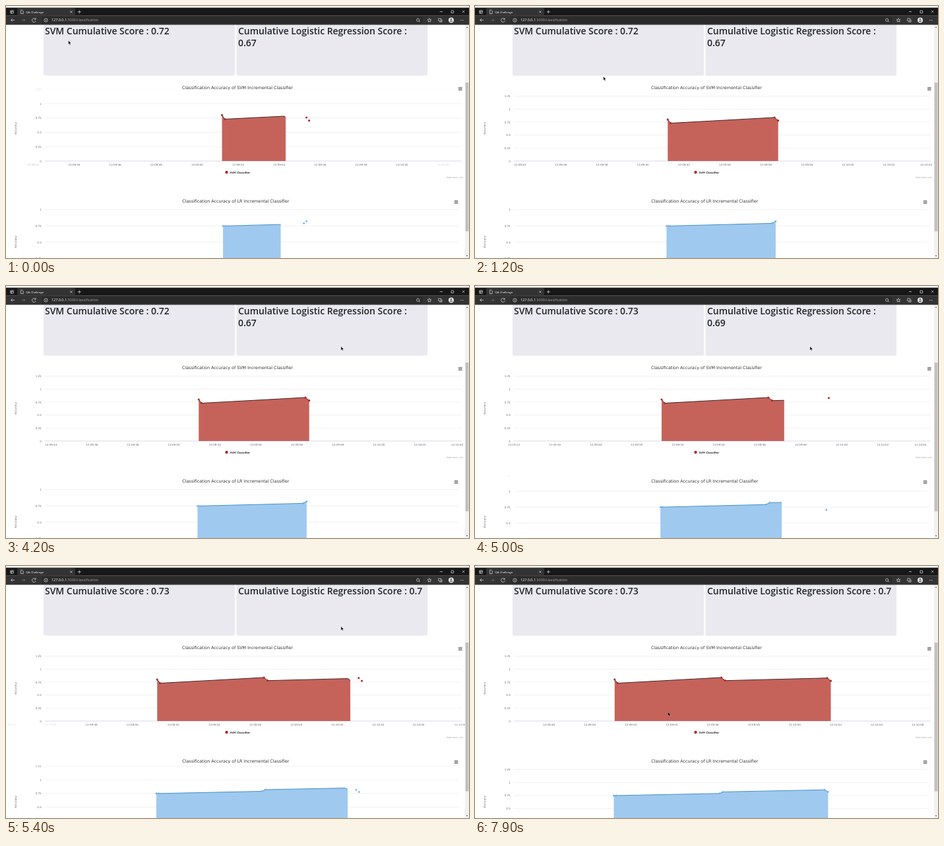
An HTML page that plays this animation: 702x382 px, repeating every 8000 ms.

```html
<!DOCTYPE html>
<html lang="en">
<head>
<meta charset="utf-8">
<title>Classification dashboard</title>
<style>
  html, body { margin: 0; width: 100%; height: 100%; overflow: hidden; background: #fff; }
  svg { display: block; width: 702px; height: 382px; }
  text { font-family: "DejaVu Sans", "Open Sans", sans-serif; }
  .ui { font-family: "Open Sans", "Noto Sans", sans-serif; fill: #fff; }
  .score { font: 600 13.95px "Open Sans", "Noto Sans", sans-serif; fill: #212529; }
  .title { font-size: 6.35px; fill: #333; text-anchor: middle; }
  .label { font-size: 4.02px; fill: #666; }
  .mid { text-anchor: middle; }
  .end { text-anchor: end; }
  .axis { font-size: 4.2px; fill: #666; text-anchor: middle; }
  .grid { stroke: #e6e6e6; stroke-width: .6; }
  .icon { fill: none; stroke: #e4e4e4; stroke-width: .7; }
  .menu { fill: none; stroke: #555; stroke-width: 1; }
</style>
</head>
<body>
<svg viewBox="0 0 702 382">
  <rect width="702" height="382" fill="#fff"/>

  <g fill="#e9e9ef">
    <rect x="57" y="20" width="290" height="85.5" rx="1.5"/>
    <rect x="349.5" y="20" width="289.5" height="85.5" rx="1.5"/>
  </g>
  <text class="score" id="svmScore" x="59" y="43"></text>
  <text class="score" id="lrScore" x="352" y="43"></text>
  <text class="score" id="lrWrap" x="352" y="60.5"></text>

  <g id="svm"></g>
  <text class="title" x="351" y="126">Classification Accuracy of SVM Incremental Classifier</text>
  <text class="axis" transform="translate(15.5 185.5) rotate(-90)">Accuracy</text>
  <path class="menu" d="M686 123.6h5.6m-5.6 1.9h5.6m-5.6 1.9h5.6"/>
  <circle cx="334.5" cy="252" r="2.2" fill="#b22a26"/>
  <text x="339.3" y="253.5" font-size="3.85" font-weight="bold" fill="#333">SVM Classifier</text>
  <text class="end" x="693" y="261.2" font-size="3.2" fill="#999">Highcharts.com</text>

  <g id="lr"></g>
  <text class="title" x="348.3" y="298">Classification Accuracy of LR Incremental Classifier</text>
  <text class="axis" transform="translate(15.5 357.5) rotate(-90)">Accuracy</text>
  <path class="menu" d="M679.8 295.4h5.6m-5.6 1.9h5.6m-5.6 1.9h5.6"/>

  <!-- scrollbar -->
  <rect x="696" y="28" width="6" height="354" fill="#f1f1f1"/>
  <rect x="696.6" y="116" width="4.8" height="225.5" fill="#c1c1c1"/>
  <path d="M697.6 33l1.4-1.6 1.4 1.6zM697.6 378l1.4 1.6 1.4-1.6z" fill="#505050"/>

  <!-- browser frame -->
  <rect width="702" height="3" fill="#fff"/>
  <rect y="2.5" width="702" height="12" fill="#171717"/>
  <rect y="14.3" width="702" height="14.2" fill="#333"/>
  <path d="M17 14.5V5q0-2 2-2h84q2 0 2 2v9.5z" fill="#333"/>
  <rect x="54" y="16.3" width="578" height="10.4" rx="1.5" fill="#2b2b2b"/>
  <text class="ui" x="30.3" y="10.5" font-size="4.3">QA Challenge</text>
  <text class="ui" x="69" y="23.4" font-size="5.45">127.0.0.1<tspan fill="#a6a6a6">:5000/classification</tspan></text>
  <g class="icon">
    <path d="M6.8 6.8h4.4v4.4h-4.4zM6.8 8.4h4.4M8.4 8.4v2.8"/>
    <path d="M22.4 6.2h2.4l1.4 1.4v4h-3.8z"/>
    <path d="M97.3 7.4l3 3m0-3l-3 3M108.8 8.9h5m-2.5-2.5v5"/>
    <path d="M13 21.4H7.6m2.4-2.4l-2.4 2.4 2.4 2.4"/>
    <path d="M23.5 21.4h5.4m-2.4-2.4l2.4 2.4-2.4 2.4" stroke="#777"/>
    <path d="M44.8 20a2.9 2.9 0 1 0 .4 2.3M45.1 18.4v1.9h-1.9"/>
    <circle cx="60.5" cy="21.5" r="2.7"/><path d="M60.5 21v2m0-3.2v.6"/>
    <circle cx="624.6" cy="21.2" r="2.1"/><path d="M626 22.8l1.8 1.4"/>
    <path d="M642 18.6l.9 1.9 2 .2-1.5 1.4.4 2-1.8-1-1.8 1 .4-2-1.5-1.4 2-.2z"/>
    <path d="M655.8 19h3.8v3.8h-3.8zM657.2 24.2h3.8v-3.8"/>
    <path d="M657.8 8.6h4.2M675 7h3.6v3.6H675zM691.9 6.8l3.4 3.4m0-3.4l-3.4 3.4"/>
  </g>
  <circle cx="675" cy="21.4" r="4" fill="#e6e6e6"/>
  <circle cx="675" cy="20.3" r="1.4" fill="#777"/>
  <path d="M672.6 24a2.4 2 0 0 1 4.8 0z" fill="#777"/>
  <g fill="#e4e4e4"><circle cx="689.4" cy="21.5" r=".5"/><circle cx="691.3" cy="21.5" r=".5"/><circle cx="693.2" cy="21.5" r=".5"/></g>

  <path id="cursor" d="M0 0v5.6l1.3-1.2.9 2 .9-.4-.9-1.9h1.7z" fill="#000" stroke="#fff" stroke-width=".25"/>
</svg>

<script>
const LOOP = 8000, STEP = 100, MOVE = 500;
const FIRST = 4888, SECOND = 5100;   // times at which new samples arrive
const LEFT = 59, SEC = 31.07;
const $ = id => document.getElementById(id);

const ease = x => (1 - Math.cos(Math.PI * Math.min(1, Math.max(0, x)))) / 2;
const lerp = (a, b, p) => a + (b - a) * p;
const mix = (a, b, p) => Array.isArray(b) ? b.map((v, i) => mix(a[i], v, p)) : lerp(a, b, p);

function add(parent, tag, attrs, text) {
  const el = document.createElementNS("http://www.w3.org/2000/svg", tag);
  set(el, attrs);
  if (text) el.textContent = text;
  return parent.appendChild(el);
}
function set(el, attrs) {
  for (const k in attrs) el.setAttribute(k, attrs[k]);
}

// Ticks run every two seconds from 12:09:40; x0 is the place of 12:09:44.
const TICKS = Array.from({ length: 14 }, (_, k) => k);
const clock = k => {
  const s = 40 + 2 * k;
  return `12:${s < 60 ? "09" : "10"}:${String(s % 60).padStart(2, "0")}`;
};

const charts = [
  {
    id: "svm", base: 235, right: 691, scale: 1, hasTime: true,
    area: "#c5635a", line: "#43282d", mark: "#b22a26", size: 1.6,
    samples: [[7.21, .8], [7.35, .73], [12.42, .84], [12.6, .78], [17.58, .83], [17.76, .775]],
    x0: [103.5, 68.2, -9.8, -12.3], unit: [87, 78.6, 78.6, 78.6], top: [.25, 1, 1, 1],
    tail: [[422, 167], [424, 168.7]], fresh: [[455.5, 169], [459.6, 173.7]]
  },
  {
    id: "lr", base: 407.2, right: 686.5, scale: .992, hasTime: false,
    area: "#9fc9ee", line: "#4590c6", mark: "#6db1e6", size: 1.5, diamond: true,
    samples: [[7.21, .75], [7.33, .75], [12.4, .79], [12.58, .82], [17.58, .86], [17.75, .82]],
    x0: [107.2, 68.2, -9.8, -12.3], unit: [98.4, 98.4, 79, 79], top: [0, 0, 1, 1],
    tail: [[413.5, 331.2], [416.5, 331]], fresh: [[451.7, 329.4], [455.7, 326.3]]
  }
];

function makeState(c, i) {
  const px = s => LEFT + (c.x0[i] + s * SEC - LEFT) * c.scale;
  const points = c.samples.slice(0, [2, 4, 5, 6][i]).map(([s, v]) => [px(s), c.base - v * c.unit[i]]);
  const ticks = TICKS.map(k => {
    const x = px(2 * k - 4), seen = x > LEFT - 1 && x < c.right + 1;
    return [seen ? Math.min(x, 684) : x, +seen];
  });
  const state = { unit: c.unit[i], top: c.top[i], ticks, path: points, marks: points };
  if (i === 0) {
    state.path = points.concat(c.tail);
    state.marks = points.concat(c.fresh);
    ticks[1][1] = .4;
    ticks[11][1] = .3;
  }
  return state;
}

// Lines grow out of their last point; new markers appear in their final place.
function blend(a, b, p) {
  const end = a.path[a.path.length - 1];
  return {
    unit: lerp(a.unit, b.unit, p),
    top: lerp(a.top, b.top, p),
    ticks: mix(a.ticks, b.ticks, p),
    path: mix(b.path.map((_, i) => a.path[i] || end), b.path, p),
    marks: mix(b.marks.map((v, i) => a.marks[i] || v), b.marks, p)
  };
}

function build(c) {
  const g = $(c.id);
  c.states = [0, 1, 2, 3].map(i => makeState(c, i));
  c.rows = [0, .25, .5, .75, 1, 1.25].map(v => ({
    v,
    line: add(g, "line", { class: "grid", x1: LEFT, x2: c.right }),
    text: add(g, "text", { class: "label end", x: 53.7 }, String(v))
  }));
  if (c.hasTime) {
    add(g, "line", { x1: LEFT, x2: c.right, y1: c.base, y2: c.base, stroke: "#ccd6eb", "stroke-width": .6 });
    c.times = TICKS.map(k => add(g, "text", { class: "label mid", y: 241.7 }, clock(k)));
  }
  c.fill = add(g, "path", { fill: c.area });
  c.stroke = add(g, "path", { fill: "none", stroke: c.line, "stroke-width": 1, "stroke-linejoin": "round" });
  const r = c.size, d = r * 1.15;
  c.dots = c.samples.map(() => c.diamond
    ? add(g, "path", { d: `M0 ${-d}L${d} 0L0 ${d}L${-d} 0z`, fill: c.mark })
    : add(g, "circle", { r, fill: c.mark }));
}

function stateAt(c, t) {
  const [s0, s1, s2, s3] = c.states;
  if (t < FIRST) {
    const done = ease(.41);   // the loop opens inside a move
    return blend(s0, s1, (ease(.41 + t / MOVE) - done) / (1 - done));
  }
  const p = ease((Math.min(t, SECOND) - FIRST) / MOVE);
  const s = blend(s1, s2, p);
  return t < SECOND ? s : blend(s, s3, ease((t - SECOND) / MOVE));
}

function draw(c, t) {
  const s = stateAt(c, t);
  for (const { v, line, text } of c.rows) {
    const y = c.base - v * s.unit, opacity = v > 1 ? s.top : 1;
    set(line, { y1: y, y2: y, opacity });
    set(text, { y: y + 1.5, opacity });
  }
  if (c.times) c.times.forEach((el, k) => set(el, { x: s.ticks[k][0], opacity: s.ticks[k][1] }));
  const d = "M" + s.path.map(p => p.join(" ")).join("L");
  const last = s.path[s.path.length - 1];
  set(c.stroke, { d });
  set(c.fill, { d: `${d}L${last[0]} ${c.base}L${s.path[0][0]} ${c.base}z` });
  c.dots.forEach((el, i) => {
    const m = s.marks[i];
    set(el, m ? { transform: `translate(${m[0]} ${m[1]})`, opacity: 1 } : { opacity: 0 });
  });
}

// time, x, y
const trail = [
  [0, 94.7, 52.5], [1000, 190, 104], [1200, 194.7, 107], [1500, 225, 107], [2600, 509, 90.5],
  [3000, 509, 90.5], [3800, 508, 91.7], [5500, 508, 91.7], [6200, 334.7, 193.8],
  [6400, 334.7, 193.8], [7200, 297, 217], [7700, 292.7, 221.6], [LOOP, 292.7, 221.6]
];
function moveCursor(t) {
  const i = trail.findIndex(k => k[0] > t);
  const a = trail[i - 1], b = trail[i];
  const [, x, y] = mix(a, b, ease((t - a[0]) / (b[0] - a[0])));
  set($("cursor"), { transform: `translate(${x} ${y})` });
}

function showScores(t) {
  const name = "Cumulative Logistic Regression Score :";
  const fits = t >= SECOND;
  $("svmScore").textContent = "SVM Cumulative Score : " + (t < FIRST ? "0.72" : "0.73");
  $("lrScore").textContent = fits ? name + " 0.7" : name;
  $("lrWrap").textContent = fits ? "" : t < FIRST ? "0.67" : "0.69";
}

charts.forEach(build);
const start = performance.now();
function frame() {
  const t = Math.floor(((performance.now() - start) % LOOP) / STEP) * STEP;
  charts.forEach(c => draw(c, t));
  showScores(t);
  moveCursor(t);
  requestAnimationFrame(frame);
}
frame();
</script>
</body>
</html>
```
